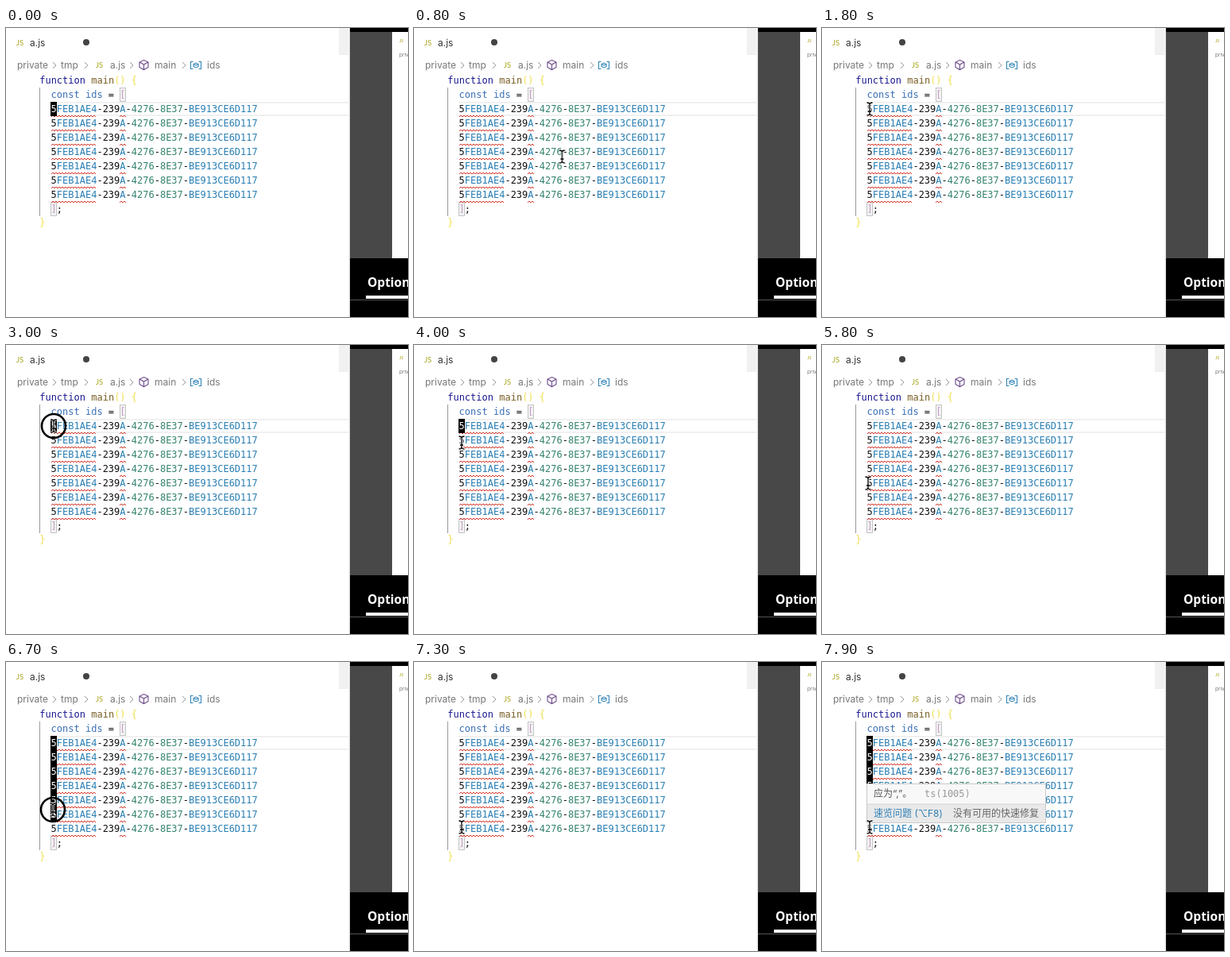
Recreate the animation shown at these times as an HTML page. Size 506 by 364 pixels, loop 8 s.

```html
<!DOCTYPE html>
<html lang="zh">
<head>
<meta charset="utf-8">
<title>Multi-cursor editing</title>
<style>
html, body { margin: 0; width: 506px; height: 364px; overflow: hidden; background: #fff; }
svg { display: block; }
text { white-space: pre; }
.ui { font: 12px Inter, "Noto Sans CJK SC", "Noto Sans CJK", "DejaVu Sans", sans-serif; fill: #777; }
.code { font: 12px "DejaVu Sans Mono", monospace; fill: #111; }
.js { font: 600 9.5px Lato, sans-serif; fill: #b5b23c; }
.key { fill: #17178f; }
.const { fill: #3a6fb5; }
.fn { fill: #795e26; }
.brace { fill: #f0df4e; }
.square { fill: #c39bc4; }
.id { fill: #2a7fb4; }
.num { fill: #35846f; }
.line { fill: none; stroke: #999; }

#pointer, #ring, #blocks, #blocks g, #tip { animation: 8s infinite step-end; }
#pointer { animation-name: move; animation-timing-function: ease-in-out; }
#ring { animation-name: press; }
#blocks { animation-name: blink; }
#tip { animation-name: tip; }
#blocks g:nth-child(2) { animation-name: row2; }
#blocks g:nth-child(3) { animation-name: row3; }
#blocks g:nth-child(4) { animation-name: row4; }
#blocks g:nth-child(5) { animation-name: row5; }
#blocks g:nth-child(6) { animation-name: row6; }

@keyframes row2 { 0% { opacity: 0 } 51.875%, to { opacity: 1 } }
@keyframes row3 { 0% { opacity: 0 } 55.625%, to { opacity: 1 } }
@keyframes row4 { 0% { opacity: 0 } 64.375%, to { opacity: 1 } }
@keyframes row5 { 0% { opacity: 0 } 74.375%, to { opacity: 1 } }
@keyframes row6 { 0% { opacity: 0 } 83.125%, to { opacity: 1 } }
@keyframes tip { 0% { opacity: 0 } 95%, to { opacity: 1 } }
@keyframes blink {
  0%, 13.75%, 26.25%, 36.25%, 48.75%, 64.375%, 74.375%, 83.125%, 95.625%, to { opacity: 1 }
  7.5%, 20%, 32.5%, 42.5%, 61.875%, 70.625%, 80.625%, 89.375% { opacity: 0 }
}
@keyframes press {
  0%, 38.75%, 54.375%, 58.125%, 66.875%, 76.875%, 85.625%, to { opacity: 0 }
  36.25%, 51.875%, 55.625%, 64.375%, 74.375%, 83.125% { opacity: 1 }
}
@keyframes move {
  0% { transform: translate(530px, 325px) }
  15.625%, 37.5% { transform: translate(60px, 102px) }
  48.75%, 52.5% { transform: translate(60px, 123px) }
  55.625%, 57.5% { transform: translate(60px, 138px) }
  62.5% { transform: translate(59px, 151px) }
  64.375%, 66.25% { transform: translate(59px, 155px) }
  72.5%, 75.625% { transform: translate(58px, 174px) }
  82.5%, 85.625% { transform: translate(59px, 186px) }
  90%, to { transform: translate(60px, 208px) }
}
</style>
</head>
<body>
<svg width="506" height="364" viewBox="0 0 506 364">
  <defs>
    <path id="chevron" d="M-2 -4 L2 0 L-2 4" class="line"/>
    <path id="beam" d="M-3.5 -8 Q0 -8 0 -5.5 Q0 -8 3.5 -8 M0 -5.5 V5.5 M-3.5 8 Q0 8 0 5.5 Q0 8 3.5 8 M-2 3 H2" fill="none"/>
  </defs>

  <!-- window behind -->
  <rect x="419" width="14" height="34" fill="#f1f1f1"/>
  <rect x="431" width="1" height="364" fill="#f5f5f5"/>
  <rect x="432" width="1" height="364" fill="#ddd"/>
  <rect x="433" width="73" height="364"/>
  <rect x="433" y="5" width="53" height="285" fill="#484848"/>
  <rect x="486" y="5" width="20" height="285" fill="#fff"/>
  <text class="js" x="495" y="18" style="font-size:5.5px">JS</text>
  <text class="ui" x="495" y="36" style="font-size:6.5px">private</text>
  <text x="455" y="326" fill="#fff" style="font:700 15.5px 'Open Sans',sans-serif">Option</text>
  <rect x="453" y="337" width="53" height="4" fill="#fff"/>
  <rect x="433" y="342" width="73" height="1" fill="#555"/>

  <!-- tab and path -->
  <text class="js" x="13" y="22">JS</text>
  <text class="ui" x="30" y="23" style="fill:#333">a.js</text>
  <circle cx="101" cy="18" r="4" fill="#444"/>
  <g class="ui">
    <text x="14" y="51">private</text>
    <text x="69" y="51">tmp</text>
    <text x="131" y="51">a.js</text>
    <text x="187" y="51">main</text>
    <text x="253" y="51">ids</text>
  </g>
  <text class="js" x="113" y="50">JS</text>
  <use href="#chevron" x="61" y="47"/>
  <use href="#chevron" x="101" y="47"/>
  <use href="#chevron" x="158" y="47"/>
  <use href="#chevron" x="224" y="47"/>
  <path d="M173.5 40.5 L179 43 V49.5 L173.5 52.5 L168 49.5 V43 Z M168 43 L173.5 46 L179 43 M173.5 46 V52" fill="none" stroke="#6b4a8a" stroke-width="1.1"/>
  <path d="M235.5 42.5 H232.5 V51.5 H235.5 M242.5 42.5 H245.5 V51.5 H242.5 M236 45.5 L239 44 L242 45.5 V48.5 L239 50 L236 48.5 Z M236 45.5 L239 47 L242 45.5" fill="none" stroke="#3485b5" stroke-width="1.1"/>

  <!-- code -->
  <path d="M56 94 H433 M56 110 H433" fill="none" stroke="#ebebeb" stroke-width="1.6"/>
  <path d="M42.5 75 V237" class="line"/>
  <g fill="#f3f3f3" stroke="#c4c4c4">
    <rect x="143.5" y="75.5" width="7" height="17"/>
    <rect x="56.5" y="219.5" width="7" height="17"/>
  </g>
  <g class="code">
    <text x="42.2" y="70"><tspan class="key">function</tspan> <tspan class="fn">main</tspan><tspan class="brace">() {</tspan></text>
    <text x="56.6" y="88"><tspan class="const">const ids</tspan> = <tspan class="square">[</tspan></text>
    <g id="rows"></g>
    <text x="56.6" y="232"><tspan class="square">]</tspan>;</text>
    <text x="42.2" y="249" class="brace">}</text>
    <g id="blocks"></g>
  </g>

  <g id="tip">
    <rect x="56.5" y="153.5" width="225" height="49" fill="#f8f8f8" stroke="#c8c8c8"/>
    <rect x="57" y="179" width="224" height="23" fill="#e9e9e9"/>
    <path d="M57 179 H281" stroke="#d4d4d4"/>
    <text class="ui" x="65" y="170" style="fill:#555">应为“,”。</text>
    <text class="code" x="129" y="170" style="fill:#999">ts(1005)</text>
    <text class="ui" x="65" y="195" style="fill:#2f7fb5">速览问题 (⌥F8)</text>
    <text class="ui" x="165" y="195" style="fill:#666">没有可用的快速修复</text>
  </g>

  <g id="pointer">
    <circle id="ring" r="15" fill="none" stroke="#000" stroke-width="2.6"/>
    <use href="#beam" stroke="#fff" stroke-width="3"/>
    <use href="#beam" stroke="#000" stroke-width="1.3"/>
  </g>
</svg>
<script>
const X = 56.6, ROW = 18, TOP = 93;
const span = (cls, s) => `<tspan class="${cls}">${s}</tspan>`;
const wave = (x, y, w) =>
  `<path d="M${x} ${y}${'l2 -2l2 2'.repeat(Math.round(w / 4))}" fill="none" stroke="#d0382b"/>`;
const uuid = '5' + span('id', 'FEB1AE4') + '-239' + span('id', 'A') + '-' +
  span('num', '4276') + '-' + span('num', '8E37') + '-' + span('id', 'BE913CE6D117');

let rows = '', blocks = '';
for (let i = 0; i < 7; i++) {
  const y = TOP + i * ROW, base = y + 13;
  rows += `<text x="${X}" y="${base}">${uuid}</text>` + wave(57, y + 19, 57) + wave(143, y + 19, 7);
  if (i < 6) {
    blocks += `<g><rect x="56" y="${y}" width="8" height="${ROW}" fill="#000"/>` +
      `<text x="${X}" y="${base}" fill="#fff">5</text></g>`;
  }
}
document.getElementById('rows').innerHTML = rows;
document.getElementById('blocks').innerHTML = blocks;
</script>
</body>
</html>
```
